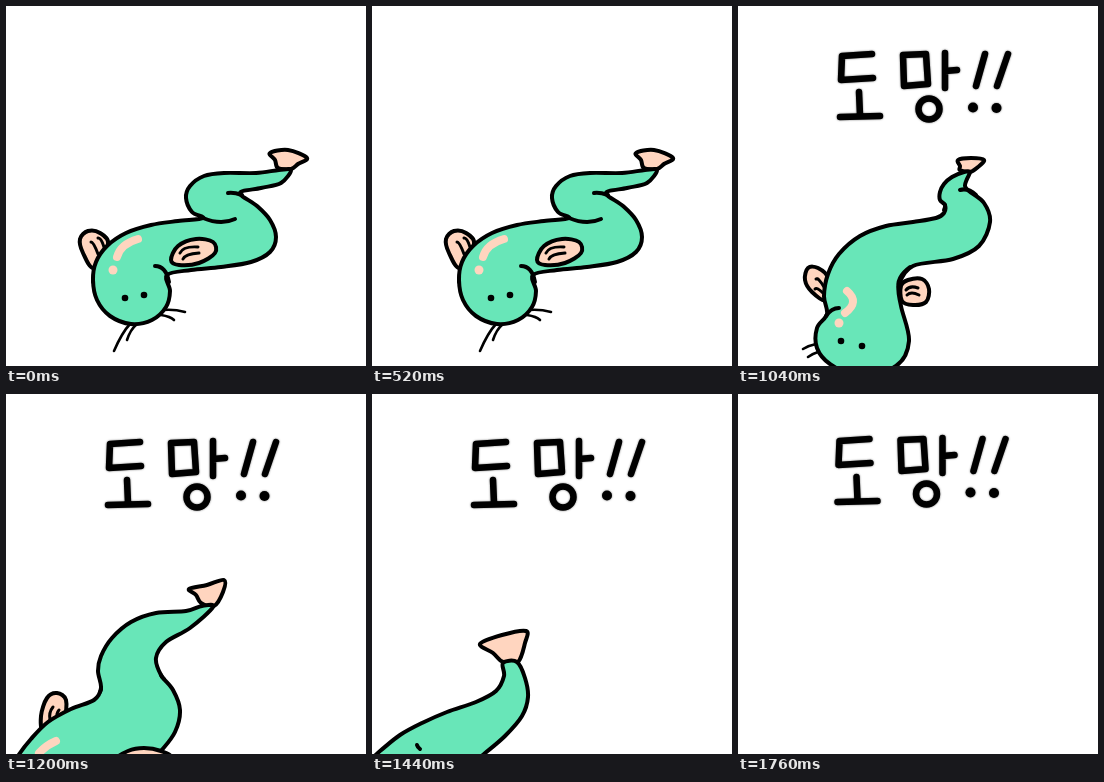
Animation, 360 px wide and 360 px high, one loop 1920 ms. Source, as an HTML page with a canvas:

```html
<!DOCTYPE html>
<html lang="ko">
<head>
<meta charset="utf-8">
<title>도망!!</title>
<style>
html, body { margin: 0; width: 100%; height: 100%; overflow: hidden; background: #fff; }
canvas { display: block; }
</style>
</head>
<body>
<canvas id="stage" width="360" height="360" role="img" aria-label="도망!!"></canvas>
<script>
const ctx = document.getElementById('stage').getContext('2d');
const LOOP = 1920;
const GREEN = '#68e6b8', PEACH = '#ffd5bf', INK = '#000';

// Each part is a flat list x, y, x, y ... with matching points in every pose.
const rest = {
  body: [273,164, 250,167, 218,167, 198,170, 184,180, 180,192, 186,206, 197,212,
    172,215, 145,219, 120,227, 101,240, 90,256, 87,274, 91,294, 104,310,
    125,318, 146,314, 160,301, 164,285, 161,269, 185,264, 215,261, 245,256,
    264,246, 270,231, 264,214, 251,200, 234,187, 255,182, 275,177, 285,164],
  tail: [264,147, 282,144, 301,152, 292,158, 285,163, 272,162, 269,154],
  finL: [88,262, 77,247, 74,233, 82,225, 94,227, 102,238],
  finR: [165,254, 172,240, 190,233, 207,236, 209,247, 193,257, 173,259],
  raysL: [[85,236, 88,239, 92,248], [92,232, 95,234, 98,241]],
  raysR: [[174,247, 180,242, 192,241], [177,253, 182,249, 193,247]],
  folds: [[197,212, 214,216, 229,213], [222,187, 228,187, 236,189],
    [149,260, 158,264, 163,276], [87,272, 87,274, 87,276]],
  whiskers: [[124,318, 116,329, 108,345], [130,319, 125,325, 121,334],
    [157,304, 168,304, 179,306], [155,309, 163,311, 168,314]],
  shine: [111,251, 118,240, 132,233],
  spots: [107,264, 119,292, 138,289]
};
const coil = {
  body: [226,166, 214,171, 206,178, 202,186, 202,194, 207,199, 206,207, 198,212,
    175,216, 148,220, 122,230, 101,248, 90,268, 86,290, 89,308, 79,322,
    79,342, 92,358, 120,370, 158,360, 171,335, 163,300, 161,279, 175,260,
    215,253, 241,240, 252,216, 246,197, 231,185, 227,180, 229,173, 232,166],
  tail: [220,154, 233,152, 246,154, 240,161, 232,166, 222,164, 222,160],
  finL: [88,294, 74,286, 67,274, 70,262, 80,262, 90,272],
  finR: [163,280, 170,274, 184,273, 191,283, 188,296, 175,299, 164,295],
  raysL: [[78,273, 81,274, 86,281], [77,283, 80,283, 85,287]],
  raysR: [[168,284, 173,281, 180,282], [169,289, 174,287, 181,289]],
  folds: [[207,199, 207,201, 206,204], [222,184, 230,184, 238,189],
    [172,261, 162,272, 161,284], [101,302, 94,304, 88,310]],
  whiskers: [[78,338, 71,340, 65,343], [80,346, 75,348, 70,351],
    [150,370, 160,372, 170,374], [145,375, 155,377, 160,380]],
  shine: [109,285, 115,296, 107,307],
  spots: [101,317, 103,335, 124,340]
};
const dive = {
  body: [196,212, 180,217, 150,219, 125,228, 106,244, 95,262, 92,277, 95,294,
    88,306, 65,315, 42,328, 25,345, 12,362, 0,385, -10,405, -15,420,
    -5,440, 20,450, 50,440, 70,420, 90,405, 110,395, 135,378, 155,357,
    169,338, 174,316, 167,296, 155,281, 150,264, 160,248, 184,234, 207,213],
  tail: [183,195, 201,191, 218,186, 217,198, 208,212, 195,209, 190,201],
  finL: [38,338, 35,322, 41,304, 51,299, 60,306, 57,325],
  finR: [110,366, 122,357, 138,354, 155,357, 165,364, 150,378, 125,378],
  raysL: [[44,326, 44,319, 47,313], [52,324, 51,320, 53,316]],
  raysR: [[125,370, 130,367, 140,367], [128,374, 135,372, 143,372]],
  folds: [[95,294, 95,296, 94,298], [155,281, 156,283, 158,285],
    [110,395, 105,399, 100,402], [0,385, -3,390, -5,395]],
  whiskers: [[-15,420, -25,425, -35,430], [-12,430, -20,436, -28,440],
    [20,450, 25,460, 30,470], [30,450, 35,460, 40,465]],
  shine: [33,359, 41,352, 50,347],
  spots: [25,370, 0,400, 20,405]
};

const shift = (v, dx, dy) => v.map((n, i) =>
  Array.isArray(n) ? shift(n, dx, dy) : n + (i % 2 ? dy : dx));
const shiftPose = (pose, dx, dy) => Object.fromEntries(
  Object.entries(pose).map(([part, v]) => [part, shift(v, dx, dy)]));

const exit = shiftPose(dive, -110, 70);
exit.body = [131,269, 132,282, 124,297, 104,308, 75,318, 50,329, 28,341, 8,357, -10,372,
  ...exit.body.slice(18, 48),
  65,400, 90,378, 112,360, 133,342, 150,322, 156,303, 153,284, 145,268];
exit.tail = [108,250, 130,241, 154,237, 153,249, 146,268, 131,268, 121,259];

const last = shiftPose(exit, -75, 90);
last.tail = [35,341, 58,327, 86,322, 85,335, 70,357, 57,358, 52,346];

const keys = [[800, rest], [1040, coil], [1200, dive], [1440, exit], [1600, last],
  [1760, shiftPose(last, -75, 90)]];

const mix = (a, b, k) => Array.isArray(a) ? a.map((n, i) => mix(n, b[i], k)) : a + (b - a) * k;

function poseAt(t) {
  if (t <= 800) return rest;
  const i = Math.max(1, keys.findIndex(key => key[0] >= t));
  const [t0, a] = keys[i - 1], [t1, b] = keys[i];
  const k = (t - t0) / (t1 - t0);
  return Object.fromEntries(Object.keys(a).map(part => [part, mix(a[part], b[part], k)]));
}

function stroke(color, width) {
  ctx.strokeStyle = color;
  ctx.lineWidth = width;
  ctx.stroke();
}

// Smooth closed outline through all points.
function blob(p, fill) {
  const n = p.length / 2;
  const at = i => { const j = (i + n) % n * 2; return [p[j], p[j + 1]]; };
  ctx.beginPath();
  ctx.moveTo(p[0], p[1]);
  for (let i = 0; i < n; i++) {
    const [a, b, c, d] = [at(i - 1), at(i), at(i + 1), at(i + 2)];
    ctx.bezierCurveTo(b[0] + (c[0] - a[0]) / 6, b[1] + (c[1] - a[1]) / 6,
      c[0] - (d[0] - b[0]) / 6, c[1] - (d[1] - b[1]) / 6, c[0], c[1]);
  }
  ctx.closePath();
  ctx.fillStyle = fill;
  ctx.fill();
  stroke(INK, 4);
}

// Open arc whose middle point lies on the curve.
function arc([x0, y0, x1, y1, x2, y2], width, color = INK) {
  ctx.beginPath();
  ctx.moveTo(x0, y0);
  ctx.quadraticCurveTo(2 * x1 - (x0 + x2) / 2, 2 * y1 - (y0 + y2) / 2, x2, y2);
  stroke(color, width);
}

function dot(x, y, r, color = INK) {
  ctx.beginPath();
  ctx.arc(x, y, r, 0, 7);
  ctx.fillStyle = color;
  ctx.fill();
}

function drawFish(p) {
  blob(p.finL, PEACH);
  p.raysL.forEach(l => arc(l, 3));
  blob(p.tail, PEACH);
  p.whiskers.forEach(l => arc(l, 2.6));
  blob(p.body, GREEN);
  p.folds.forEach(l => arc(l, 4));
  blob(p.finR, PEACH);
  p.raysR.forEach(l => arc(l, 3));
  arc(p.shine, 8, PEACH);
  const s = p.spots;
  dot(s[0], s[1], 4.5, PEACH);
  dot(s[2], s[3], 3.3);
  dot(s[4], s[5], 3.3);
}

function drawSweat(t) {
  if (t < 160 || t >= 520) return;
  const [x, y] = t < 320 ? [101.5, 275] : t < 440 ? [102, 284] : [104.5, 293];
  ctx.beginPath();
  ctx.moveTo(x, y);
  ctx.bezierCurveTo(x + 2, y + 9, x + 5.5, y + 12, x + 5.5, y + 18);
  ctx.arc(x, y + 18, 5.5, 0, Math.PI);
  ctx.bezierCurveTo(x - 5.5, y + 12, x - 2, y + 9, x, y);
  ctx.fillStyle = '#d4f6ff';
  ctx.fill();
}

const letters = new Path2D(
  'M134 48L104 50L103 74L135 72M121 86L122 109M102 111L142 110' +
  'M165 49L188 48L190 78L166 80ZM207 47L207 82M207 65L219 64' +
  'M180.500 103a10.500 10.500 0 1 0 21 0a10.500 10.500 0 1 0-21 0' +
  'M247 48L238 80M270 48L259 80');

function drawShout(t) {
  if (t < 880) return;
  const low = (t >= 1040 && t < 1240) || (t >= 1400 && t < 1560);
  ctx.save();
  if (!low) ctx.translate(-2.5, -3);
  ctx.shadowColor = 'rgba(0,0,0,.6)';
  ctx.shadowBlur = 2;
  ctx.strokeStyle = INK;
  ctx.lineWidth = 6.5;
  ctx.stroke(letters);
  dot(235, 101.5, 5);
  dot(258.5, 102, 5);
  ctx.restore();
}

function frame(now) {
  const t = now % LOOP;
  const step = t < 1200 ? 80 : 40;
  ctx.clearRect(0, 0, 360, 360);
  ctx.lineCap = ctx.lineJoin = 'round';
  if (t < 1760) drawFish(poseAt(Math.floor(t / step) * step));
  drawSweat(t);
  drawShout(t);
  requestAnimationFrame(() => frame(performance.now()));
}
frame(0);
</script>
</body>
</html>
```
